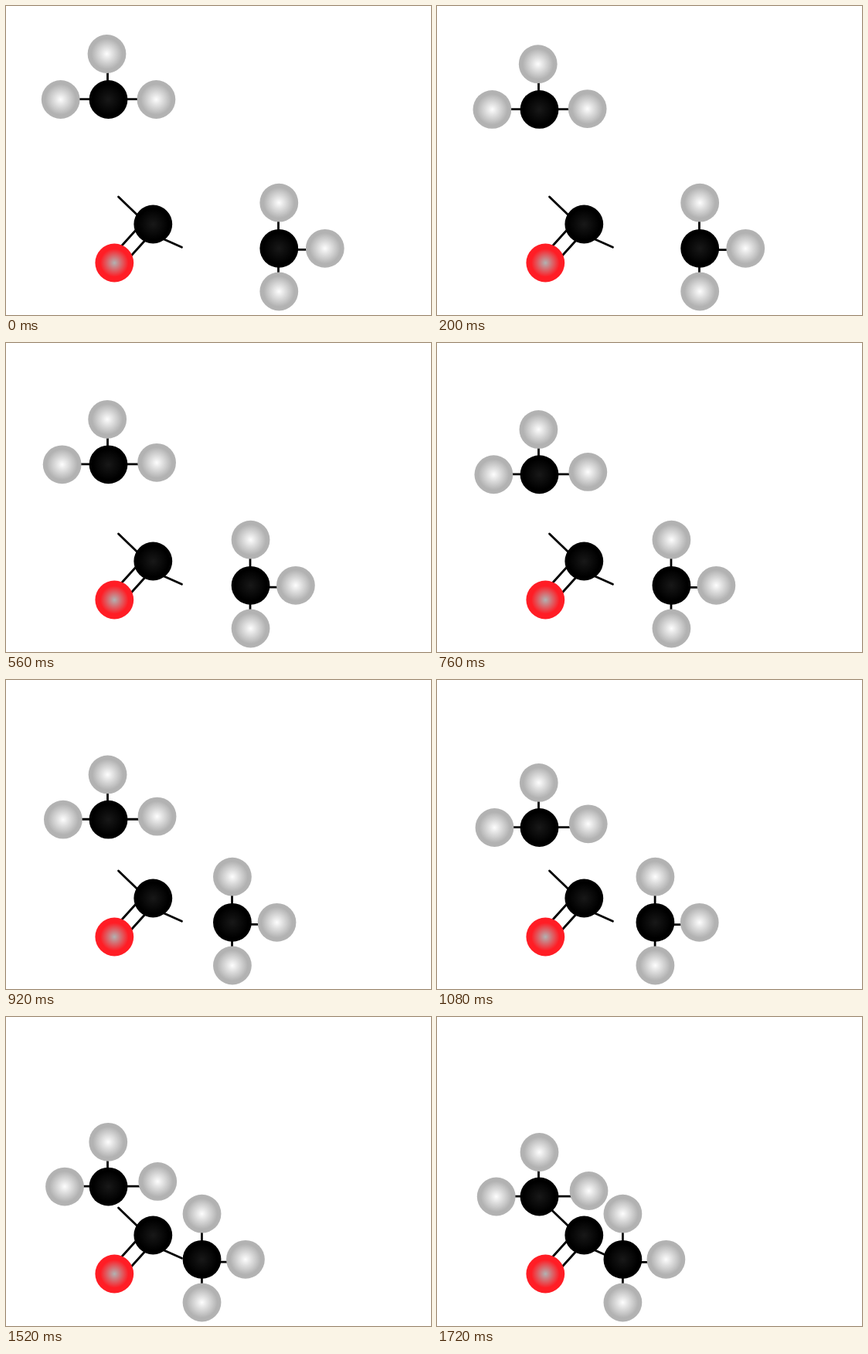
An HTML page with a canvas that plays this animation: 550x400 px, repeating every 2.16 s.

```html
<!DOCTYPE html>
<html lang="en">
<head>
<meta charset="utf-8">
<title>Molecule assembly</title>
<style>
  html, body { margin: 0; width: 100%; height: 100%; overflow: hidden; background: #fff; }
  canvas { display: block; }
</style>
</head>
<body>
<canvas id="stage" width="550" height="400"></canvas>
<script>
const ctx = document.getElementById('stage').getContext('2d');
const STEP = 40, MOVE_STEPS = 43, LOOP = 2160, RADIUS = 24.9;

// Each palette lists [offset, colour] from the centre of the ball outwards.
const HYDROGEN = [[0, '#fdfdfd'], [0.8, '#b2b2b2'], [1, '#b2b2b2']];
const CARBON = [[0, '#181818'], [0.8, '#000'], [1, '#000']];
const OXYGEN = [[0, '#b2b2b2'], [0.73, '#ff1d25'], [1, '#ff1d25']];

const mix = (a, b, p) => a + (b - a) * p;

function ball(x, y, palette) {
  const fill = ctx.createRadialGradient(x, y, 0, x, y, RADIUS);
  for (const [offset, color] of palette) fill.addColorStop(offset, color);
  ctx.fillStyle = fill;
  ctx.beginPath();
  ctx.arc(x, y, RADIUS, 0, Math.PI * 2);
  ctx.fill();
}

function bond(x1, y1, x2, y2) {
  ctx.beginPath();
  ctx.moveTo(x1, y1);
  ctx.lineTo(x2, y2);
  ctx.stroke();
}

function carbonyl() {
  bond(145.5, 247, 175, 275.5);
  bond(195, 297.8, 227.5, 312.2);
  bond(141, 320, 174, 283.5);
  bond(155, 331, 188, 294.5);
  ball(190.3, 282.5, CARBON);
  ball(140.3, 332.5, OXYGEN);
}

function upperMethyl(p) {
  const y = mix(121, 232.5, p);
  const top = mix(62, 175, p);
  bond(71, y - 0.4, 190, y - 0.4);
  bond(131.5, top, 131.5, y);
  ball(mix(70.7, 76.7, p), y, HYDROGEN);
  ball(mix(194.4, 196.5, p), mix(121, 225, p), HYDROGEN);
  ball(mix(130.5, 132.5, p), top, HYDROGEN);
  ball(132.5, y, CARBON);
}

function rightMethyl(p) {
  const x = mix(353.3, 240.4, p);
  const side = mix(412.8, 296.4, p);
  const stem = mix(352.5, 240.4, p);
  const bondY = mix(315.4, 317.4, p);
  bond(stem, 254.7, stem, 369.5);
  bond(x, bondY, side, bondY);
  ball(x, 254.7, HYDROGEN);
  ball(x, 369.5, HYDROGEN);
  ball(side, 313.8, HYDROGEN);
  ball(x, 313.8, CARBON);
}

function draw() {
  const step = Math.floor((performance.now() % LOOP) / STEP);
  const progress = Math.min(step / MOVE_STEPS, 1);
  ctx.fillStyle = '#fff';
  ctx.fillRect(0, 0, 550, 400);
  ctx.lineWidth = 2.8;
  ctx.lineCap = 'round';
  ctx.strokeStyle = '#000';
  carbonyl();
  upperMethyl(progress);
  rightMethyl(progress);
  requestAnimationFrame(draw);
}
draw();
</script>
</body>
</html>
```
